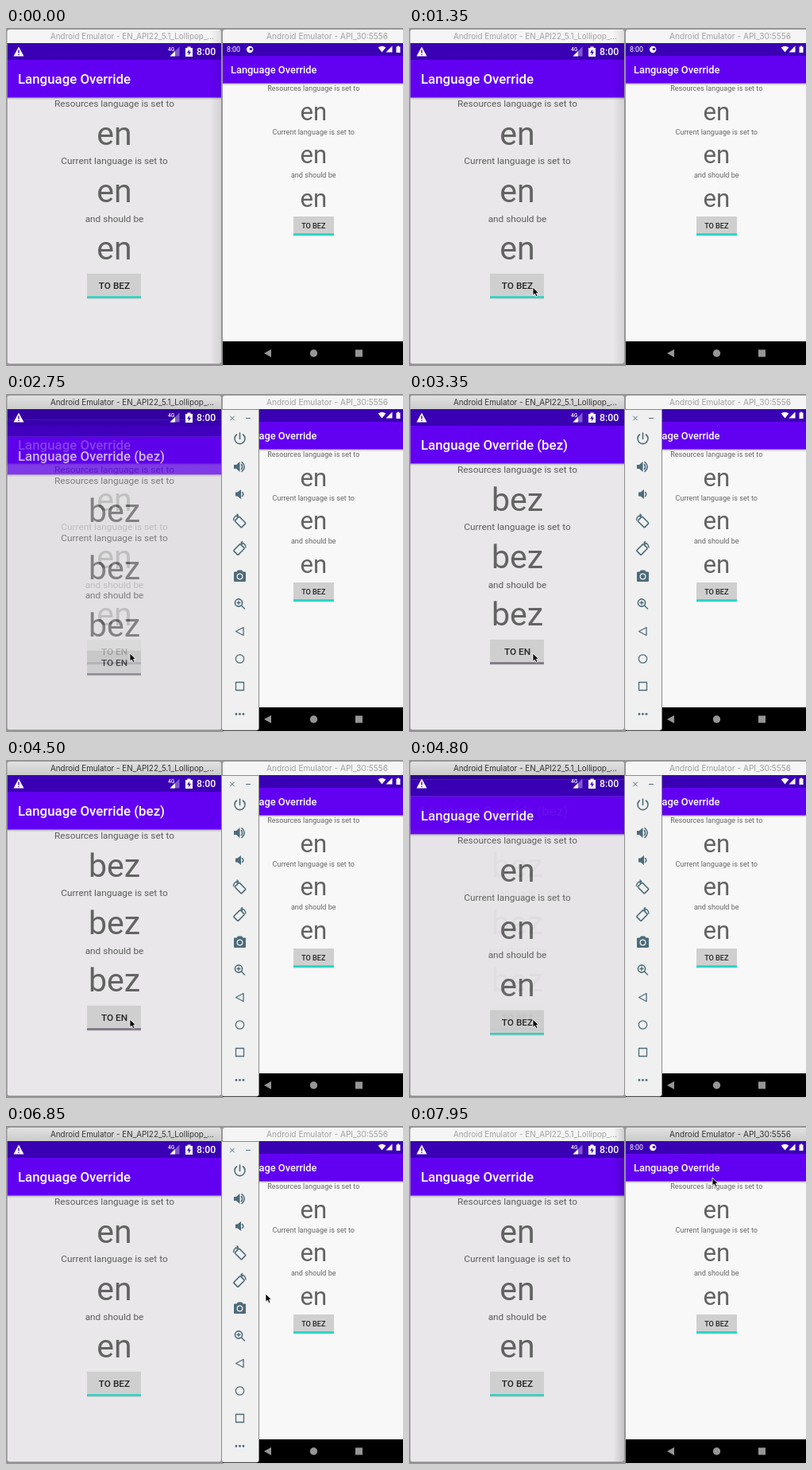
An HTML page for the animation above (8 s loop, 500x425 px).

```html
<!DOCTYPE html>
<html lang="en">
<head>
<meta charset="utf-8">
<title>Language Override</title>
<style>
html, body { margin: 0; width: 100%; height: 100%; overflow: hidden; background: #969696; }
svg { display: block; width: 500px; height: 425px; }
text { font-family: Roboto, sans-serif; white-space: pre; }
.title { font-family: Inter, sans-serif; }
.medium { font-weight: 500; }
.mid { text-anchor: middle; }
.icon { fill: none; stroke: #4c6b7a; stroke-width: 1.6; stroke-linejoin: round; stroke-linecap: round; }
.solid { fill: #4c6b7a; }
</style>
</head>
<body>
<svg viewBox="0 0 500 425" xmlns="http://www.w3.org/2000/svg">
  <defs>
    <linearGradient id="focused" x2="0" y2="1">
      <stop stop-color="#e2e2e2"/><stop offset="1" stop-color="#cbcbcb"/>
    </linearGradient>
    <linearGradient id="barShadow" x2="0" y2="1">
      <stop stop-opacity=".22"/><stop offset="1" stop-opacity="0"/>
    </linearGradient>
    <linearGradient id="sideShadow">
      <stop stop-opacity="0"/><stop offset="1" stop-opacity=".16"/>
    </linearGradient>
    <clipPath id="leftScreen"><path d="M1.500 19H271V419Q271 422 268 422H4.500Q1.500 422 1.500 419Z"/></clipPath>
  </defs>

  <rect width="500" height="425" fill="#969696"/>

  <g id="right">
    <path id="rightBar" d="M273 19V5Q273 2 276 2H500V19Z"/>
    <text id="rightTitle" class="title" font-size="10.150" x="328" y="14.300">Android Emulator - API_30:5556</text>
    <g id="rightApp"></g>
    <g fill="#fff">
      <text x="278" y="30.200" font-size="8.800">8:00</text>
      <circle cx="307.200" cy="27" r="4.200"/>
      <path d="M306.800 25.200H310V27.800H306.800Z" fill="#3a00b4"/>
      <path d="M468.700 24.500Q473.500 20.800 478.300 24.500L473.500 30.500Z"/>
      <path d="M486.500 22.500V30.500H478.500Z"/>
      <path d="M491.500 23.500H493V22.500H495V23.500H496.500V31H491.500Z"/>
    </g>
    <rect x="273" y="394" width="227" height="30"/>
    <g fill="#969696">
      <path d="M325 409L334 404V414Z"/>
      <circle cx="387.500" cy="409" r="4.700"/>
      <rect x="440" y="404.500" width="9" height="9"/>
    </g>
  </g>

  <g id="left">
    <path id="leftBar" d="M1.500 19V5Q1.500 2 4.500 2H268Q271 2 271 5V19Z"/>
    <text id="leftTitle" class="title" font-size="9.850" x="56" y="14.300">Android Emulator - EN_API22_5.1_Lollipop_...</text>
    <g id="leftApp" clip-path="url(#leftScreen)"></g>
    <g fill="#fff">
      <path d="M16 23.500L22.500 35.500H9.500Z"/>
      <path d="M16 27.500V31.500M16 32.700V34" stroke="#3a00b4" stroke-width="1.400"/>
      <text class="medium" x="204" y="29" font-size="6.500">4G</text>
      <path d="M218.500 23.500V35.500H206.500Z" opacity=".35"/>
      <path d="M213 29V35.500H206.500Z"/>
      <path d="M226 25H228.500V23.500H232.500V25H235V36H226Z"/>
      <path d="M231.300 26.500L228 31.200H230.200L229.700 34.700L233 29.800H230.800Z" fill="#3a00b4"/>
      <text class="medium" x="240" y="34" font-size="12.300">8:00</text>
    </g>
  </g>
  <rect id="shade" x="257" y="3" width="14" height="419" fill="url(#sideShadow)"/>

  <g id="panel">
    <path d="M271.500 19.500H318.500V420Q318.500 423 315.500 423H274.500Q271.500 423 271.500 420Z" fill="#f0f0f0" stroke="#8b8b8b"/>
    <g class="icon">
      <path d="M282.500 28L287.500 33M287.500 28L282.500 33M302.500 30.500H307.500" stroke-width="1"/>
      <path d="M290.500 51A6.500 6.500 0 1 0 298.500 51M294.500 49V56.500"/>
      <path d="M296.500 88.500Q298.500 91.500 296.500 94.500M297 85.500Q303.500 91.500 297 97.500"/>
      <path d="M297.500 123.500Q300 126 297.500 128.500"/>
      <g id="rotate">
        <rect x="-6" y="-4" width="12" height="8" rx="1" transform="translate(295 161) rotate(45)"/>
        <path d="M286.500 158.500Q287 153 292.500 152.500L291 151M292.500 152.500L291 154.500" stroke-width="1.400"/>
      </g>
      <use href="#rotate" transform="translate(588.500 34.500) scale(-1 1)"/>
      <circle cx="293" cy="262.500" r="4.600"/>
      <path d="M296.500 266L300.500 270M291 262.500H295M293 260.500V264.500" stroke-width="1.400"/>
      <path d="M289.500 298.500L299 293.500V303.500Z" stroke-width="1.300"/>
      <circle cx="294.500" cy="333" r="5.200" stroke-width="1.300"/>
      <rect x="289.500" y="362.500" width="10" height="10" stroke-width="1.300"/>
    </g>
    <g class="solid">
      <path d="M287 89H290L294.500 85V98L290 94H287Z"/>
      <path d="M289 123.500H291.500L296 120V132L291.500 128.500H289Z"/>
      <path d="M288 223.500H290.500L292 221.500H297L298.500 223.500H301Q302 223.500 302 224.500V235Q302 236 301 236H288Q287 236 287 235V224.500Q287 223.500 288 223.500Z"/>
      <circle cx="294.500" cy="229.500" r="3.300" fill="none" stroke="#f0f0f0" stroke-width="1.300"/>
      <circle cx="290" cy="402.500" r="1.400"/><circle cx="294.500" cy="402.500" r="1.400"/><circle cx="299" cy="402.500" r="1.400"/>
    </g>
  </g>

  <path id="cursor" d="M0 0V10.200L2.400 8.100L4 11.600L5.900 10.800L4.400 7.300H7.400Z" stroke="#fff" stroke-width=".8"/>
</svg>

<script>
const LOOP = 8000;
const FOCUS_LEFT = 1700, FOCUS_RIGHT = 7650;
const toggles = [
  { click: 2620, start: 2697, from: 'en', to: 'bez' },
  { click: 4620, start: 4700, from: 'bez', to: 'en' }
];
const cursorPath = [
  [800, 148, 424], [1350, 156, 326], [6350, 156, 326],
  [6850, 327, 211], [7500, 392, 11], [7680, 392, 11], [7950, 382, 65]
];
const el = id => document.getElementById(id);
const clamp = v => Math.max(0, Math.min(1, v));

const leftLayout = {
  x: 1.5, width: 269.5, center: 136.5, status: [19, 40], bar: [40, 87.5], bottom: 422, body: '#e9e7e9',
  title: [15, 70, 16.85], labelY: 99.3, wordY: 147.2, pitch: 72.1, label: 11.8, word: 41, ink: '#5c5c5c',
  button: [102, 308.8, 68, 30.7], buttonY: 328
};
const rightLayout = {
  x: 273, width: 227, center: 387.3, status: [19, 35], bar: [35, 69.6], bottom: 394, body: '#f8f8f8',
  title: [283, 57, 12.87], labelY: 79.4, wordY: 115.7, pitch: 54.4, label: 9.1, word: 31.2, ink: '#666',
  button: [362, 237, 51, 23.5], buttonY: 251.7
};

function screen(o, language, buttonLanguage = language) {
  const rect = (x, y, w, h, fill) => `<rect x="${x}" y="${y}" width="${w}" height="${h}" fill="${fill}"/>`;
  const text = (x, y, size, fill, value, cls) =>
    `<text x="${x}" y="${y}" font-size="${size}" fill="${fill}" class="${cls}">${value}</text>`;
  const band = (top, bottom, fill) => rect(o.x, top, o.width, bottom - top, fill);
  const [bx, by, bw, bh] = o.button;
  const isEn = buttonLanguage === 'en';
  const rows = ['Resources language is set to', 'Current language is set to', 'and should be'].map((label, i) =>
    text(o.center, o.labelY + i * o.pitch, o.label, o.ink, label, 'mid') +
    text(o.center, o.wordY + i * o.pitch, o.word, '#636363', language, 'mid'));
  return band(o.status[0], o.bottom + 40, o.body) +
    band(...o.status, '#3a00b4') + band(...o.bar, '#6200f2') +
    band(o.bar[1], o.bar[1] + 3, 'url(#barShadow)') +
    text(...o.title, '#fff', 'Language Override' + (language === 'bez' ? ' (bez)' : ''), 'medium') +
    rows.join('') +
    rect(bx, by + 1, bw, bh, '#bdbdbd') + rect(bx, by, bw, bh - 1, '#cfcfcf') +
    rect(bx, by + bh - 2.2, bw, 2.2, isEn ? '#14d6c4' : '#73697a') +
    text(o.center, o.buttonY, o.label, '#222', isEn ? 'TO BEZ' : 'TO EN', 'mid medium');
}

// The new screen fades in while sliding up over the dimming old one.
function leftScreen(t) {
  const toggle = toggles.filter(g => t >= g.click).pop();
  if (!toggle) return screen(leftLayout, 'en');
  const age = t - toggle.start;
  if (age >= 350) return screen(leftLayout, toggle.to);
  const old = screen(leftLayout, toggle.from, toggle.to);
  if (age < 0) return old;
  const alpha = 1 - (1 - clamp(age / 200)) ** 4;
  const shift = 32 * (1 - age / 350) ** 5;
  return old + `<rect y="19" width="272" height="404" opacity="${0.2 * clamp(age / 100)}"/>` +
    `<g opacity="${alpha}" transform="translate(0 ${shift})">${screen(leftLayout, toggle.to)}</g>`;
}

function cursorAt(t) {
  const i = cursorPath.findIndex(p => p[0] > t);
  if (i < 0) return cursorPath[cursorPath.length - 1].slice(1);
  if (i === 0) return null;
  const [t0, x0, y0] = cursorPath[i - 1], [t1, x1, y1] = cursorPath[i];
  const u = (t - t0) / (t1 - t0), e = u * u * (3 - 2 * u);
  return [x0 + (x1 - x0) * e, y0 + (y1 - y0) * e];
}

function setFocus(side, on) {
  el(side + 'Bar').setAttribute('fill', on ? 'url(#focused)' : '#f5f5f5');
  el(side + 'Title').setAttribute('fill', on ? '#333' : '#a0a0a0');
}

const show = (id, on) => el(id).setAttribute('visibility', on ? 'visible' : 'hidden');
let lastMarkup = '';

function render(t) {
  const leftFocused = t >= FOCUS_LEFT && t < FOCUS_RIGHT;
  const rightFocused = t >= FOCUS_RIGHT;
  setFocus('left', leftFocused);
  setFocus('right', rightFocused);
  show('panel', leftFocused);
  show('shade', !leftFocused);
  el('shade').setAttribute('opacity', rightFocused ? 1 : 0.6);

  const markup = leftScreen(t);
  if (markup !== lastMarkup) el('leftApp').innerHTML = lastMarkup = markup;

  const tip = cursorAt(t);
  show('cursor', tip);
  if (tip) el('cursor').setAttribute('transform', `translate(${tip})`);
}

el('rightApp').innerHTML = screen(rightLayout, 'en');
const began = performance.now();
function tick() {
  render((performance.now() - began) % LOOP);
  requestAnimationFrame(tick);
}
tick();
</script>
</body>
</html>
```
